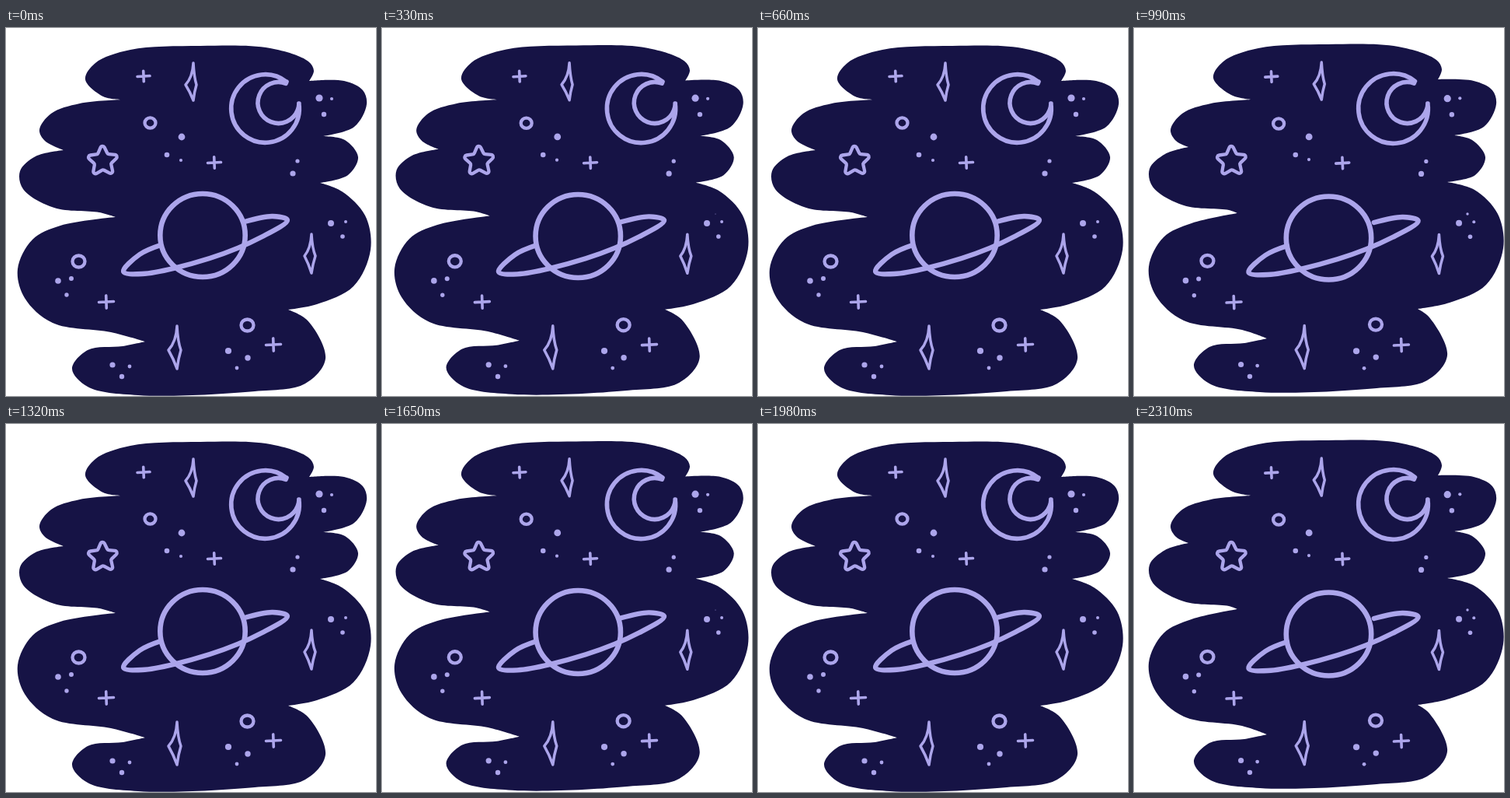
Animation, 476 px wide and 473 px high, one loop 2.64 s. Source, as an HTML page with a canvas:

```html
<!DOCTYPE html>
<html lang="en">
<head>
<meta charset="utf-8">
<title>Night sky</title>
<style>
html, body { margin: 0; width: 100%; height: 100%; overflow: hidden; background: #fff; }
canvas { display: block; }
</style>
</head>
<body>
<canvas id="sky" width="476" height="473"></canvas>
<script>
const ctx = document.getElementById('sky').getContext('2d');
const NAVY = '#161345', LILAC = '#aca5eb';
const HOLD = 330;
const SWAYS = [0, 0.3, 0, 1]; // how far the drawing drifts in each step
const TAU = Math.PI * 2;

// Each lobe runs from the previous lobe's tip through pts to its own tip.
// move and tipMove are the drift of its body and of its tip.
const lobes = [
  { pts: [125,88, 102,66, 115,45, 160,28, 250,23, 340,26, 389,43, 396,55], tip: [390,68], move: [0,-2], tipMove: [1,-2] },
  { pts: [435,68, 459,80, 464,98, 448,127], tip: [408,139], move: [2,0], tipMove: [4,-1] },
  { pts: [436,144, 453,166, 440,189], tip: [404,199], move: [-1,0], tipMove: [-1,-1] },
  { pts: [432,210, 462,241, 469,285, 447,332, 400,355], tip: [363,362], move: [6,-2], tipMove: [2,-1] },
  { pts: [388,376, 411,425, 385,457, 320,467, 170,472, 105,461, 85,438, 105,414, 150,409], tip: [179,403], move: [-8,-4], tipMove: [-8,-4] },
  { pts: [135,391, 60,379, 24,347, 15,310, 34,272, 70,254], tip: [141,243], move: [4,-3], tipMove: [-8,-5] },
  { pts: [120,237, 62,231, 22,207, 18,184, 38,165], tip: [74,157], move: [2,-3], tipMove: [-4,-4] },
  { pts: [50,145, 43,131, 58,110, 95,97], tip: [149,92], move: [4,0], tipMove: [2,0] }
];

const orbit = [199,279, 172,291, 151,313, 175,316, 262,296, 330,268, 362,247, 343,242, 307,249];

// x, y, half width, height above, height below, lean
const gems = [[238,73,7,28,20,3], [391,293,7,28,22,2], [217,414,8,31,24,3]];
// x, y, size
const pluses = [[177,62,8], [268,173,8.5], [129,352,9.5], [344,407,9.5]];
const rings = [[185.5,122,7], [93.5,300,8], [310.5,382,8]];
const dots = [
  [403,90,4.6], [419,91,2.1], [409,111,3.2], [226,140,4.4], [207,163,3.3], [225,170,2.1], [375,171,2.6],
  [369,187,3.6], [418,251,4], [437,249,2], [433,268,2.8], [67,325,3.8], [84,322,3], [78,343,2.7],
  [286,415,4.1], [311,424,3.7], [297,437,2.4], [137,433,3.6], [159,435,2.4], [149,448,3.2]
];

const noise = n => {
  const v = Math.sin(n * 12.9898) * 43758.5453;
  return (v - Math.floor(v)) * 2 - 1;
};

// Small marks wander by about a pixel
const wander = ([x, y, ...rest], sway) =>
  [x + noise(x) * sway, y + noise(y) * sway, ...rest];

const shift = ([x, y], [dx, dy], sway) => [x + dx * sway, y + dy * sway];

const pairs = list => {
  const out = [];
  for (let i = 0; i < list.length; i += 2) out.push([list[i], list[i + 1]]);
  return out;
};

// Bezier handle at p on the way to next, centripetal Catmull-Rom
function handle(prev, p, next) {
  const a = Math.sqrt(Math.hypot(p[0] - prev[0], p[1] - prev[1]));
  const b = Math.sqrt(Math.hypot(next[0] - p[0], next[1] - p[1]));
  if (!a || !b) return p;
  return p.map((v, i) =>
    (a * a * next[i] - b * b * prev[i] + (2 * a * a + 3 * a * b + b * b) * v) / (3 * a * (a + b)));
}

function spline(pts) {
  for (let i = 0; i < pts.length - 1; i++) {
    const p = pts[i], q = pts[i + 1];
    const c = handle(pts[i - 1] || p, p, q);
    const d = handle(pts[i + 2] || q, q, p);
    ctx.bezierCurveTo(...c, ...d, ...q);
  }
}

function stroke(width, trace) {
  ctx.lineWidth = width;
  ctx.beginPath();
  trace();
  ctx.stroke();
}

function cloud(sway) {
  const last = lobes[lobes.length - 1];
  let from = shift(last.tip, last.tipMove, sway);
  ctx.beginPath();
  ctx.moveTo(...from);
  for (const { pts, tip, move, tipMove } of lobes) {
    const end = shift(tip, tipMove, sway);
    spline([from, ...pairs(pts).map(p => shift(p, move, sway)), end]);
    from = end;
  }
  ctx.fill();
}

function planet(sway) {
  stroke(6.6, () => ctx.ellipse(253 - 2.5 * sway, 266.5 + 3.5 * sway, 54.7, 53.5, 0, 0, TAU));
  const pts = pairs(orbit).map(([x, y]) => [x + (x - 256) * 0.035 * sway, y + sway]);
  stroke(6.3, () => {
    ctx.moveTo(...pts[0]);
    spline(pts);
  });
}

function moon(sway) {
  const tips = [[361, 69], [377 + sway, 97]];
  const arc = (x, y, r) => {
    const [a, b] = tips.map(p => Math.atan2(p[1] - y, p[0] - x));
    ctx.moveTo(...tips[0]);
    ctx.arc(x, y, r, a, b, true);
    ctx.lineTo(...tips[1]);
  };
  stroke(5.6, () => {
    arc(333.5, 103.5, 43.8 + sway);
    arc(350.5 + sway, 96, 26.5);
  });
}

function star(x, y) {
  const at = i => {
    const r = i % 2 ? 11 : 23, a = (i / 10) * TAU - TAU / 4 - 0.02;
    return [x + r * Math.cos(a), y + r * Math.sin(a)];
  };
  stroke(4.3, () => {
    const p = at(0), q = at(9);
    ctx.moveTo((p[0] + q[0]) / 2, (p[1] + q[1]) / 2);
    for (let i = 0; i < 10; i++) ctx.arcTo(...at(i), ...at(i + 1), 2.8);
    ctx.closePath();
  });
}

function gem([x, y, w, up, down, lean]) {
  const top = [x + lean, y - up], base = [x + lean, y + down];
  stroke(3.5, () => {
    ctx.moveTo(...top);
    for (const side of [1, -1]) {
      ctx.quadraticCurveTo(x + lean + side, y - up * 0.35, x + side * w, y);
      ctx.quadraticCurveTo(x + lean / 2 + side * w * 0.4, y + down * 0.45, ...base);
      ctx.moveTo(...top);
    }
  });
}

function plus([x, y, r]) {
  stroke(3.6, () => {
    ctx.moveTo(x - r, y + 0.5);
    ctx.lineTo(x + r, y - 0.5);
    ctx.moveTo(x - 0.3, y - r * 0.85);
    ctx.lineTo(x + 0.3, y + r * 0.85);
  });
}

function ring([x, y, r]) {
  stroke(4.3, () => ctx.ellipse(x, y, r, r * 0.94, 0, 0, TAU));
}

function dot([x, y, r]) {
  ctx.beginPath();
  ctx.arc(x, y, r, 0, TAU);
  ctx.fill();
}

function draw(sway) {
  ctx.fillStyle = '#fff';
  ctx.fillRect(0, 0, 476, 473);
  ctx.fillStyle = NAVY;
  cloud(sway);
  ctx.fillStyle = ctx.strokeStyle = LILAC;
  ctx.lineCap = ctx.lineJoin = 'round';
  planet(sway);
  moon(sway);
  star(124.5 + sway, 171);
  for (const [paint, marks] of [[gem, gems], [plus, pluses], [ring, rings], [dot, dots]])
    marks.forEach(m => paint(wander(m, sway)));
  dot([429, 239, 1.7 * sway]);
}

const start = performance.now();
function tick() {
  const step = Math.floor((performance.now() - start) / HOLD);
  draw(SWAYS[step % SWAYS.length]);
  requestAnimationFrame(tick);
}
tick();
</script>
</body>
</html>
```
